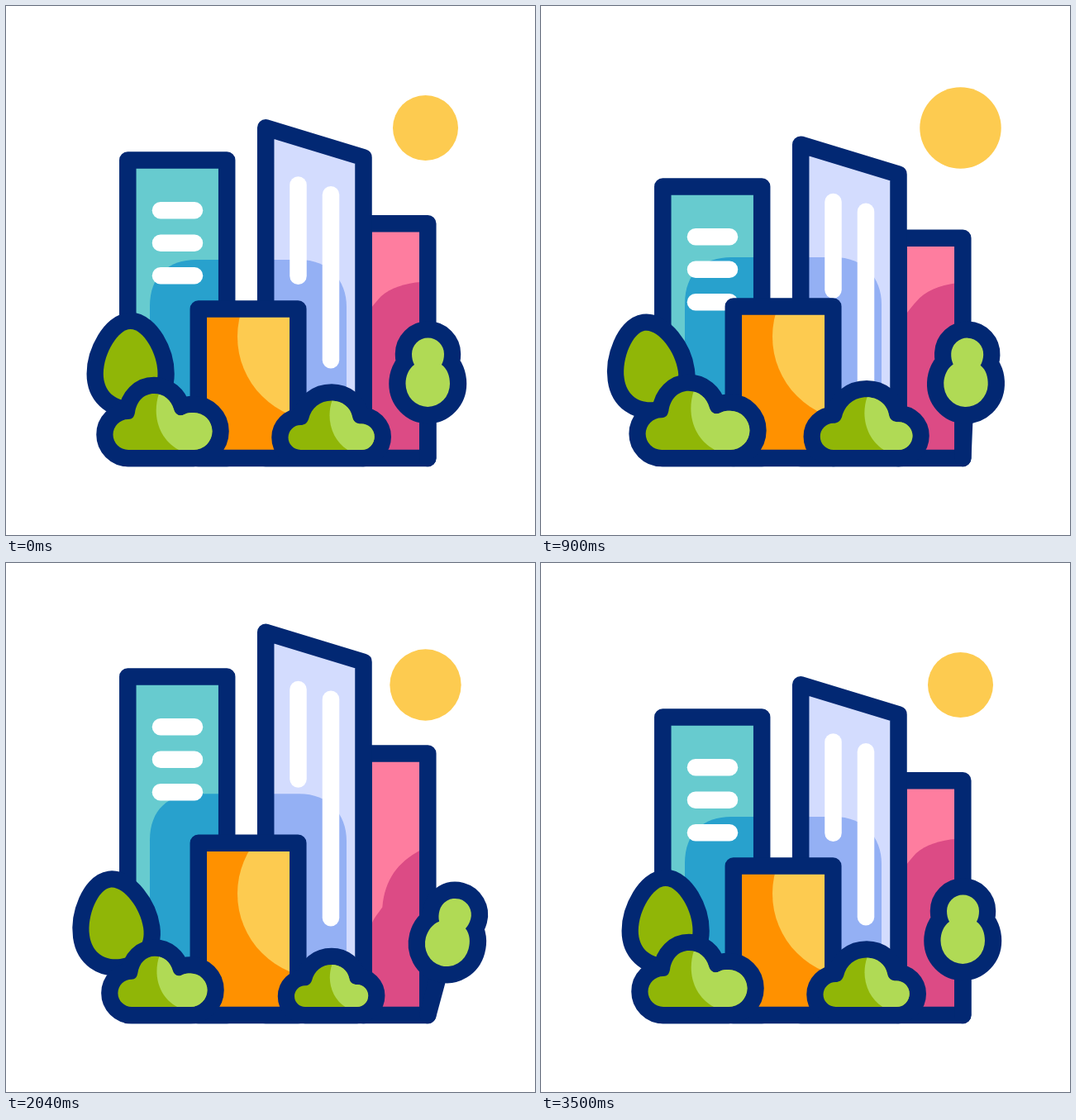
An HTML page with a canvas for the animation above (3600 ms loop, 640x640 px).

```html
<!DOCTYPE html>
<html lang="en">
<head>
<meta charset="utf-8">
<title>City</title>
<style>
  html, body { margin: 0; width: 100%; height: 100%; overflow: hidden; background: #fff; }
  canvas { display: block; width: 640px; height: 640px; }
</style>
</head>
<body>
<canvas id="stage"></canvas>
<script>
const LOOP = 3600, SIZE = 640, GROUND = 547, LINE = 20.5;
const C = {
  navy: '#022873', teal: '#67cbcf', blue: '#28a1cd', lilac: '#d3dcfe', sky: '#94b0f4',
  pink: '#fe7d9f', rose: '#dc4b85', orange: '#ff9100', yellow: '#fdcb50',
  green: '#90b607', lime: '#b0da55', white: '#fff'
};

const canvas = document.getElementById('stage');
const ctx = canvas.getContext('2d');
const dpr = window.devicePixelRatio || 1;
canvas.width = canvas.height = SIZE * dpr;
ctx.scale(dpr, dpr);
ctx.lineJoin = ctx.lineCap = 'round';

// Eased path through poses that never overshoots them.
function ease(times, poses) {
  const n = times.length;
  const slope = i => (poses[i + 1] - poses[i]) / (times[i + 1] - times[i]);
  const tan = times.map((_, i) => {
    if (i === 0 || i === n - 1) return 0;
    const a = slope(i - 1), b = slope(i);
    return a * b <= 0 ? 0 : 2 * a * b / (a + b);
  });
  return t => {
    if (t <= times[0]) return poses[0];
    if (t >= times[n - 1]) return poses[n - 1];
    let i = 0;
    while (t > times[i + 1]) i++;
    const d = times[i + 1] - times[i], u = (t - times[i]) / d, w = 1 - u;
    return w * w * ((1 + 2 * u) * poses[i] + u * d * tan[i]) +
           u * u * ((3 - 2 * u) * poses[i + 1] - w * d * tan[i + 1]);
  };
}

// Every part follows the same beats: crouch, spring, stretch, crouch, rebound, rest.
const START = 120, BEATS = [620, 1180, 1960, 2550, 2920, 3420];
function bounce(crouch, spring, stretch, land, rebound = 0, lag = 0) {
  return ease([START, ...BEATS.map(b => b + lag)], [0, crouch, spring, stretch, land, rebound, 0]);
}

const motion = {
  office: bounce(87, -30, -54, 41),
  tower: bounce(68, -36, -68, 20),
  block: bounce(36, -11.5, -34, 6.6, 5, 20),
  shop: bounce(27.3, -33, -31, 26),
  shortBar: bounce(0, -7, -2, 0),
  longBar: bounce(50, 11, 0, 20),
  egg: bounce(0, -10.2, -12.7, 4, -3.6, -130),
  pear: bounce(-4.6, 12.1, 15.8, -6.6, 4.5, 20),
  bushA: bounce(.13, -.05, -.11, .1),
  bushB: bounce(.196, -.075, -.155, .042),
  sun: ease([START, 820, 1640, 2620, 3400], [0, 10, 0, 10, 0])
};

const eggShape = new Path2D('M150.6 391C166 391 183.5 420 183.5 445C183.5 466 170 478 150.6 478C132 478 117.8 466 117.8 445C117.8 420 136 391 150.6 391Z');
const pearShape = new Path2D('M491 421A19.5 19.5 0 0 1 530 421C530 426 529 430 527 434C534 439 537 448 537 457A26.75 28 0 0 1 483.5 457C483.5 448 487 439 494 434C492 430 491 426 491 421Z');
const bushes = {
  a: {
    x: 189,
    body: new Path2D('M148 537A18.5 18.5 0 0 1 148 500C153 500 155 497 156 492C158 478 167 469 179 469C191 469 200 477 203 488C205 495 211 497 216 494C220 492 223 492 227 492A22.5 22.5 0 0 1 227 537Z'),
    light: new Path2D('M186 466C175.5 494 184.5 525 211 538H260V466Z')
  },
  b: {
    x: 393.5,
    body: new Path2D('M356.5 537A15 15 0 0 1 356.5 507C361 507 364 505 366 500C369.5 486 380 477.5 394 477.5C407 477.5 417 486 419 497C420 503 424 505.5 430 505.5A15.75 15.75 0 0 1 430 537Z'),
    light: new Path2D('M395 476C386 500 395 527 415 538H460V476Z')
  }
};

function placed(path, x, y, angle, scale = 1) {
  const m = new DOMMatrix().translate(x, y).rotate(angle).scale(scale).translate(-x, -y);
  const out = new Path2D();
  out.addPath(path, m);
  return out;
}

function fill(path, color) {
  ctx.fillStyle = color;
  ctx.fill(path);
}

function stroke(path, color = C.navy, width = LINE) {
  ctx.strokeStyle = color;
  ctx.lineWidth = width;
  ctx.stroke(path);
}

function disc(x, y, r, color) {
  const path = new Path2D();
  path.arc(x, y, r, 0, 2 * Math.PI);
  fill(path, color);
}

function bar(x0, y0, x1, y1) {
  stroke(new Path2D(`M${x0} ${y0}L${x1} ${y1}`), C.white);
}

function within(path, paint) {
  ctx.save();
  ctx.clip(path);
  paint();
  ctx.restore();
}

function building(x0, y0, x1, y1, color, details) {
  const wall = new Path2D(`M${x0} ${GROUND}V${y0}L${x1} ${y1}V${GROUND}Z`);
  fill(wall, color);
  within(wall, details);
  stroke(wall);
}

function foliage(path, color) {
  stroke(path, C.navy, 2 * LINE - .5);
  fill(path, color);
}

function bush({ x, body, light }, grow) {
  const shape = placed(body, x, 537, 0, 1 + grow);
  foliage(shape, C.green);
  within(shape, () => fill(placed(light, x, 537, 0, 1 + grow), C.lime));
}

// The shade on the pink wall sinks as the tree leans away.
function roseShade(angle) {
  const k = Math.pow(Math.max(0, angle) / 12.2, 1.25);
  const p = (x, y, dx, dy) => `${x + dx * k} ${y + dy * k} `;
  return new Path2D('M' + p(502, 334, 0, 10) + 'C' + p(484, 335, -8, 21) + p(465, 341, -5, 32) +
    p(454, 351, 1, 50) + 'C' + p(450, 355, -1, 54) + p(446, 360, -2, 55) + p(442, 365, 0, 56) + 'V548H502Z');
}

function draw(t) {
  const m = {};
  for (const key in motion) m[key] = motion[key](t);
  const { office, tower, block, shop } = m;

  ctx.fillStyle = C.white;
  ctx.fillRect(0, 0, SIZE, SIZE);
  disc(507.5, 147.5, 39.5 + m.sun, C.yellow);

  building(432.5, 263.2 + block, 510.3, 263.2 + block, C.pink, () => fill(roseShade(m.pear), C.rose));

  building(147.3, 186.6 + office, 267.2, 186.6 + office, C.teal, () => {
    fill(new Path2D(`M174 640V${363 + shop}C174 ${326 + shop} 197 ${307 + shop} 230 ${307 + shop}H270V640Z`), C.blue);
    for (let i = 0; i < 3; i++) {
      const y = 247.3 + i * 39.5 + office;
      bar(187, y, 228, y);
    }
  });

  building(314.2, 147.2 + tower, 432.5, 183.2 + tower, C.lilac, () => {
    fill(new Path2D(`M314 ${307 + shop}H355C390 ${307 + shop} 412 ${331 + shop} 412 ${364 + shop}V640H314Z`), C.sky);
    bar(353.5, 216.5 + tower, 353.5, 326.7 + tower + m.shortBar);
    bar(393, 228.3 + tower, 393, 428.2 + m.longBar);
  });

  building(232.8, 366.5 + shop, 353.3, 366.5 + shop, C.orange, () => disc(382, 400, 102, C.yellow));

  stroke(placed(new Path2D('M510.3 547V480'), 510.3, GROUND, m.pear));
  foliage(placed(pearShape, 510.3, GROUND, m.pear), C.lime);
  foliage(placed(eggShape, 151, 570, m.egg), C.green);
  bush(bushes.a, m.bushA);
  bush(bushes.b, m.bushB);
}

const start = performance.now();
function tick() {
  draw((performance.now() - start) % LOOP);
  requestAnimationFrame(tick);
}
tick();
</script>
</body>
</html>
```
